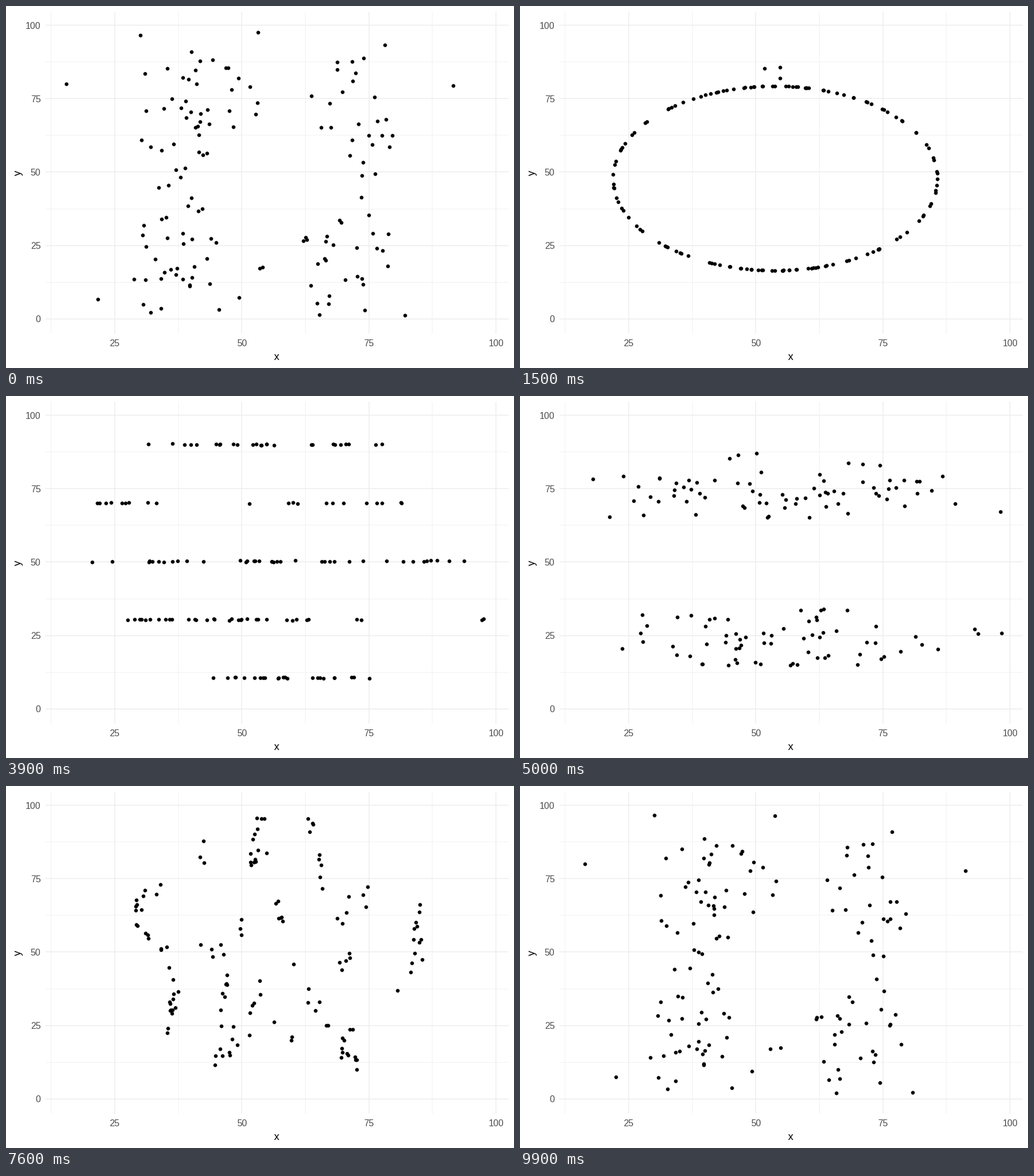
A matplotlib script for the animation above (10 s loop, 885 by 632 pixels).

```python
import matplotlib.pyplot as plt
import numpy as np
from matplotlib.animation import FuncAnimation

W, H, DPI = 885, 632, 100
FRAMES, INTERVAL = 100, 100
N = 142
PX = 72 / DPI  # points per pixel

# Key points of the dinosaur's strokes.
DINO = [
    [(55, 97), (43, 92), (36, 80), (26, 71), (22, 60), (24, 52), (40, 51.4),
     (57, 56), (62, 69)],
    [(57, 55), (48, 38), (35, 30), (30, 37), (38, 49)],
    [(30, 36), (30, 29), (36, 25), (44, 25.6), (57, 42), (68, 48), (71.5, 62),
     (69.5, 69.5)],
    [(47, 80), (49, 85), (56.7, 86), (54, 80.6), (47, 78)],
    [(58, 99.5), (65, 97.5), (74, 83), (83, 56), (88, 46), (98.2, 33.7)],
    [(57, 40.6), (64, 24)],
    [(74, 23), (63, 19), (50, 17.5), (45, 13.7), (56, 14.5)],
    [(46, 6), (50.5, 9.5), (78, 10.6)],
    [(68, 8.7), (68, 3)],
]

rng = np.random.default_rng(12)


def segments(lines):
    pairs = [p for line in lines for p in zip(line[:-1], line[1:])]
    a, b = np.array(pairs, float).transpose(1, 0, 2)
    return a, b


def sample(lines, n):
    """n points evenly spaced along all strokes together."""
    a, b = segments(lines)
    length = np.hypot(*(b - a).T)
    ends = np.cumsum(length)
    at = (np.arange(n) + .5) / n * ends[-1]
    k = np.searchsorted(ends, at)
    t = 1 - (ends[k] - at) / length[k]
    return a[k] + t[:, None] * (b - a)[k]


def jitter(points, sx, sy=None):
    return points + rng.normal(size=points.shape) * (sx, sx if sy is None else sy)


def snap(points, lines, noise):
    """Move every point to the nearest place on a set of polylines."""
    a, b = segments(lines)
    ab = b - a
    t = ((points[:, None] - a) * ab).sum(axis=2) / (ab ** 2).sum(axis=1)
    feet = a + np.clip(t, 0, 1)[..., None] * ab
    nearest = ((points[:, None] - feet) ** 2).sum(axis=2).argmin(axis=1)
    return jitter(feet[np.arange(len(points)), nearest], noise)


def around(center, angle, rx, ry):
    return np.column_stack([center[0] + rx * np.cos(angle),
                            center[1] + ry * np.sin(angle)])


def away():
    """Two uneven columns around an empty middle, with a few far points."""
    far = [(15.5, 80.1), (21.7, 6.7), (91.6, 79.5), (30, 96.7), (53.2, 97.5),
           (78.1, 93.2), (82.1, 1.3)]
    left = rng.random(900) < .55
    x = np.where(left, 40, 69) + rng.normal(size=900) * np.where(left, 6.5, 6)
    y = 91 * rng.beta(1.3, 1.3, size=900)
    hole = ((x - 57) / 15) ** 2 + ((y - 48) / 21) ** 2
    keep = (hole > 1) & (x > 28) & (x < 81)
    cloud = np.column_stack([x, y])[keep][:N - len(far)]
    return rng.permutation(np.vstack([far, cloud]))


def bullseye(base):
    center = np.array([55, 47.8])
    dx, dy = (jitter(base, 4) - center).T
    ring = np.where(np.hypot(dx, dy) < 27, 18, 36.6) + rng.normal(size=N) * .5
    return around(center, np.arctan2(dy, dx), ring, ring * 1.02)


def circle(base):
    """A ring that is densest at the top and bottom; the eye stays outside."""
    center = np.array([53.8, 47.9])
    dx, dy = (base - center).T
    rank = np.argsort(np.argsort(np.arctan2(dy, dx)))
    u = 2 * np.pi * (rank + rng.normal(size=N)) / N - np.pi
    points = around(center, u + .27 * np.sin(2 * u), 31.9, 31.4)
    eye = np.hypot(*(base - (53, 84)).T).argsort()[:3]
    points[eye] = base[eye]
    return points


def dots(base):
    xs, ys = np.array([26, 50.7, 76]), np.array([17, 50.3, 84])
    pick = lambda v, grid: grid[np.abs(v[:, None] - grid).argmin(axis=1)]
    points = np.column_stack([pick(base[:, 0], xs), pick(base[:, 1], ys)])
    return jitter(points + .05 * (base - points), .6)


def two_bands(v, split, low, high):
    """Scatter values inside two bands given as (middle, spread, min, max)."""
    mid, sd, least, most = np.where(v[:, None] > split, high, low).T
    return np.clip(mid + sd * rng.normal(size=len(v)), least, most)


def high_lines(base):
    x, y = jitter(base, 4).T
    return np.column_stack([x, two_bands(y, 47, (22, 5, 15, 34), (75, 5, 65, 87))])


def wide_lines(base):
    x, y = jitter(base, 4, 6).T
    bands = two_bands(x, 54.5, (39, 5, 27.5, 50), (71, 3.5, 64, 78))
    return np.column_stack([bands, y])


dino = sample(DINO, N)
rows = [[(0, y), (100, y)] for y in np.linspace(10.6, 90, 5)]
columns = [[(x, 0), (x, 100)] for x in np.linspace(30.4, 89.6, 4)]
falling = [[(c - 120, 120), (c, 0)] for c in (50, 70, 100, 130, 150)]
rising = [[(-60, c - 60), (120, c + 120)] for c in (-50, -30, 0, 30, 50)]
reach = np.where(np.arange(11) % 2, .43, 1)
star = around((57, 50), np.pi * (.5 + np.arange(11) / 5), 30.5 * reach, 42 * reach)
cross = [[(31, 97), (38, 77.5), (60, 50), (80, 25), (84, 5)],
         [(32, 4), (36, 20), (60, 50), (80, 75), (85, 97)]]

STATES = [
    away(),
    bullseye(dino),
    circle(dino),
    dino,
    dots(dino),
    snap(jitter(dino, 2.5), rows, (.15)) ,
    high_lines(dino),
    snap(jitter(dino, 4), falling, .7),
    snap(jitter(dino, 4), rising, .7),
    snap(jitter(dino, 3), [star], .6),
    snap(jitter(dino, 3), columns, .25),
    wide_lines(dino),
    snap(jitter(dino, 4), cross, .9),
]
STATES = [np.clip(s, (15.5, 0), (98.3, 99.6)) for s in STATES]

# First and last frame of each move to the next state, with short rests between.
REST = 2
MOVES, start = [], 1
for length in [6] * 10 + [5] * 3:
    MOVES.append((start, start + length))
    start += length + REST


def ease(t):
    return 4 * t ** 3 if t < .5 else 1 - (2 - 2 * t) ** 3 / 2


def positions(frame):
    for k, (first, last) in enumerate(MOVES):
        if frame < last:
            t = ease(max(0, frame - first) / (last - first))
            return (1 - t) * STATES[k] + t * STATES[(k + 1) % len(STATES)]


def to_x(x):
    return 189.4 + (x - 25) * 8.857


def to_y(y):
    return 546.3 - y * 5.127


fig = plt.figure(figsize=(W / DPI, H / DPI), dpi=DPI, facecolor="white")
ax = fig.add_axes([0, 0, 1, 1])
ax.set_xlim(0, W)
ax.set_ylim(H, 0)
ax.axis("off")


def grid(xs, ys, width):
    style = dict(color="#EBEBEB", lw=width * PX, snap=False,
                 solid_capstyle="butt", zorder=1)
    for x in xs:
        ax.plot([int(to_x(x)) + .5] * 2, [10, 572], **style)
    for y in ys:
        ax.plot([68.7, 875.7], [int(to_y(y)) + .5] * 2, **style)


def label(x, y, text, size, color, **align):
    ax.text(x, y, text, fontsize=size * PX, color=color,
            family="Liberation Sans", **align)


ticks = np.arange(0, 101, 25)
grid(ticks[:-1] + 12.5, ticks[:-1] + 12.5, .67)
grid(ticks[1:], ticks, 1.33)
for v in ticks[1:]:
    label(to_x(v), 593.5, str(v), 16, "#4D4D4D", ha="center", va="baseline")
for v in ticks:
    label(60.5, to_y(v) + 6, str(v), 16, "#4D4D4D", ha="right", va="baseline")
label(471.5, 618, "x", 18.33, "black", ha="center", va="baseline")
label(21.5, 291, "y", 18.33, "black", ha="center", va="center", rotation=90)

points, = ax.plot([], [], "o", color="black", ms=6.5 * PX, mew=0,
                  antialiased=False, zorder=2)


def update(frame):
    x, y = positions(frame).T
    points.set_data(to_x(x), to_y(y))
    return points,


anim = FuncAnimation(fig, update, frames=FRAMES, interval=INTERVAL,
                     repeat=True, repeat_delay=0, blit=False)
plt.show()
```
